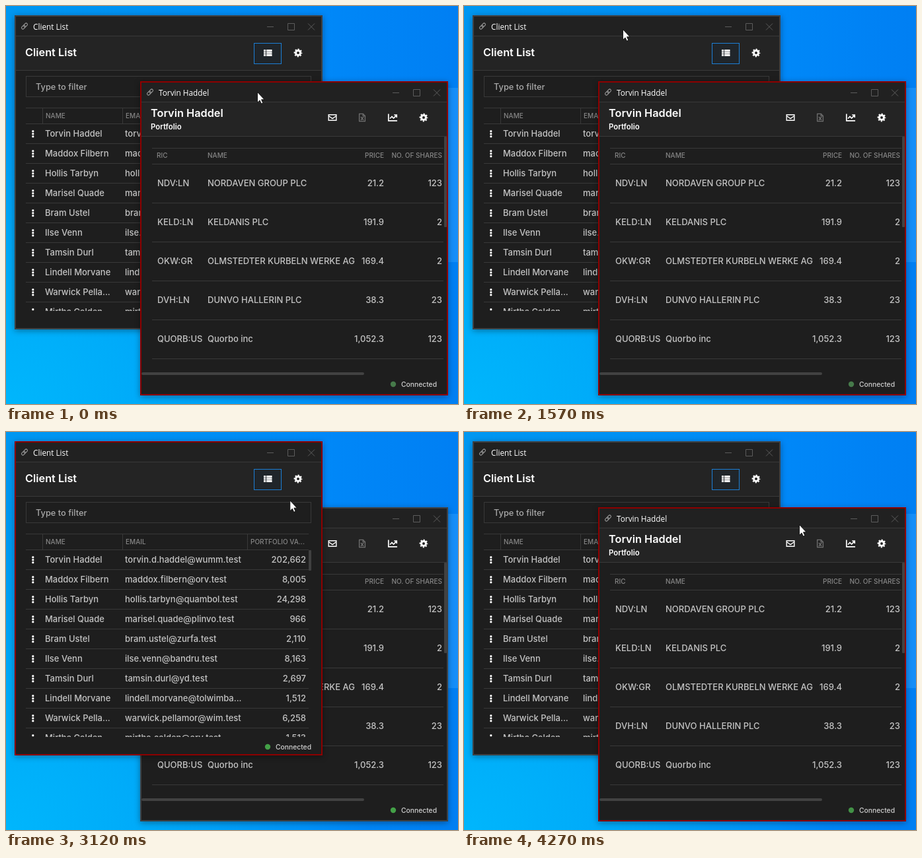
An HTML page that plays this animation: 684x603 px, repeating every 5930 ms.

```html
<!DOCTYPE html>
<html lang="en">
<head>
<meta charset="utf-8">
<title>Window focus</title>
<style>
  html, body { margin: 0; width: 100%; height: 100%; overflow: hidden; background: #008cf2; }
  svg { display: block; width: 684px; height: 603px; }
  text { font: 500 13px Inter, sans-serif; fill: #c4c4c4; white-space: pre; }
  .caption { font: 400 11.8px "Open Sans", sans-serif; fill: #fff; }
  .heading { font-size: 16.3px; font-weight: 600; fill: #fff; }
  .subtitle { font-size: 11.4px; font-weight: 600; fill: #fff; }
  .column { font-size: 10px; fill: #868686; }
  .status { font-size: 10.3px; fill: #d0d0d0; }
  .hint { font-size: 12.8px; fill: #a9a9a9; }
  .end { text-anchor: end; }
  .frame { fill: #1e1e1e; filter: drop-shadow(0 2px 5px rgba(0, 0, 0, .36)); }
  .border { fill: none; stroke-width: 2; }
</style>
</head>
<body>
<svg viewBox="0 0 684 603">
  <defs>
    <linearGradient id="sky">
      <stop offset="0" stop-color="#0097f1"/>
      <stop offset=".35" stop-color="#0090f3"/>
      <stop offset=".7" stop-color="#0088f8"/>
      <stop offset="1" stop-color="#007ff3"/>
    </linearGradient>
    <radialGradient id="glow" cx="0" cy="1" r=".8">
      <stop offset="0" stop-color="#00b6fc"/>
      <stop offset=".35" stop-color="#00b2fb" stop-opacity=".8"/>
      <stop offset="1" stop-color="#00b2fb" stop-opacity="0"/>
    </radialGradient>
    <clipPath id="clientRows"><rect x="15" y="155" width="460" height="307"/></clipPath>
  </defs>
  <rect width="684" height="603" fill="url(#sky)"/>
  <rect width="684" height="603" fill="url(#glow)"/>
  <rect x="668" y="124" width="264" height="264" fill="#2a9dff" opacity=".5"/>
  <g id="windows"><g id="clients"></g><g id="portfolio"></g></g>
  <path id="cursor" fill="#fff" stroke="#000" stroke-width=".8"/>
</svg>
<script>
const LOOP = 5930, STEP = 70;
const OWNER = 'Torvin Haddel';

const CLIENTS = [
  [OWNER, 'torvin.d.haddel@wumm.test', '202,662'],
  ['Maddox Filbern', 'maddox.filbern@orv.test', '8,005'],
  ['Hollis Tarbyn', 'hollis.tarbyn@quambol.test', '24,298'],
  ['Marisel Quade', 'marisel.quade@plinvo.test', '966'],
  ['Bram Ustel', 'bram.ustel@zurfa.test', '2,110'],
  ['Ilse Venn', 'ilse.venn@bandru.test', '8,163'],
  ['Tamsin Durl', 'tamsin.durl@yd.test', '2,697'],
  ['Lindell Morvane', 'lindell.morvane@tolwimba...', '1,512'],
  ['Warwick Pella...', 'warwick.pellamor@wim.test', '6,258'],
  ['Mirtha Calden', 'mirtha.calden@orv.test', '1,513']
];

const HOLDINGS = [
  ['NDV:LN', 'NORDAVEN GROUP PLC', '21.2', '123'],
  ['KELD:LN', 'KELDANIS PLC', '191.9', '2'],
  ['OKW:GR', 'OLMSTEDTER KURBELN WERKE AG', '169.4', '2'],
  ['DVH:LN', 'DUNVO HALLERIN PLC', '38.3', '23'],
  ['QUORB:US', 'Quorbo inc', '1,052.3', '123']
];

const box = (x, y, w, h, fill, extra = '') =>
  `<rect x="${x}" y="${y}" width="${w}" height="${h}" fill="${fill}" ${extra}/>`;
const label = (x, y, text, kind = '') => `<text x="${x}" y="${y}" class="${kind}">${text}</text>`;
const rule = (x, y, w) => box(x, y, w, 1, '#393939');
const stroke = (d, color, width = 1) =>
  `<path d="${d}" fill="none" stroke="${color}" stroke-width="${width}"/>`;
const at = (x, y, art) => `<g transform="translate(${x} ${y})">${art}</g>`;

const gear = (x, y) => at(x, y, `<g fill="none" stroke="#fff">
  <circle r="3.5" stroke-width="3"/>
  <circle r="5.4" stroke-width="2" stroke-dasharray="2.12" stroke-dashoffset="1.06"/></g>`);
const listIcon = (x, y) => at(x, y, [-5, -1.5, 2].map(top =>
  box(-6, top, 3, 3, '#fff') + box(-2, top, 8.5, 3, '#fff')).join(''));
const mailIcon = (x, y) => at(x, y, stroke('M-5.8-4.3H5.8V4.3H-5.8ZM-5.8-2.5L0 1.6L5.8-2.5', '#fff', 1.4));
const sheetIcon = (x, y) => at(x, y,
  stroke('M-4.4-5.6H1.4L4.4-2.6V5.6H-4.4ZM1.2-5.6V-2.4H4.4M-2-1L2 4M2-1L-2 4', '#707070', 1.3));
const chartIcon = (x, y) => at(x, y,
  stroke('M-6.2-5.5V4.8H7M-4 1.5L-1-1.5L1.5 1L5.5-3.2M2.2-4H6.2V0', '#fff', 1.7));

// Frame, title bar and header band shared by both windows.
const chrome = (title, dotY) => `
  <rect class="frame" x="13" y="14" width="466" height="476"/>
  ${box(15, 16, 462, 81, '#242424')}${box(15, 16, 462, 29, '#212121')}
  ${rule(15, 45, 462)}${rule(15, 97, 462)}
  <g transform="translate(28 30.5) rotate(-45)" fill="none" stroke="#a0a0a0">
    <rect x="-5.5" y="-2" width="6.5" height="4" rx="2"/><rect x="-1" y="-2" width="6.5" height="4" rx="2"/></g>
  ${label(41, 36, title, 'caption')}
  ${stroke('M395 31.5H405M426.5 26.5H436.5V36.5H426.5ZM457 26.5L467 36.5M467 26.5L457 36.5', '#5c5c5c')}
  <circle class="dot" cx="396" cy="${dotY}" r="4.2" fill="#43a047"/>
  ${label(462, dotY + 3.5, 'Connected', 'status end')}
  <rect class="border" x="14" y="15" width="464" height="474"/>`;

const clientRow = ([name, email, value], i) => {
  const y = 193 + 30 * i;
  return [-4, 0, 4].map(d => box(39.3, y + d - .7, 3, 3, '#fff', 'rx=".8"')).join('')
    + label(59, y + 5, name) + label(180, y + 5, email) + label(454, y + 5, value, 'end')
    + rule(30, y + 15, 428);
};

const holdingRow = ([ric, name, price, shares], i) => {
  const y = 273 + 59 * i;
  return label(229, y, ric) + label(305, y, name) + label(572, y, price, 'end')
    + label(660, y, shares, 'end') + rule(221, y + 25, 441);
};

const clients = document.getElementById('clients');
const portfolio = document.getElementById('portfolio');
const windows = document.getElementById('windows');
const cursor = document.getElementById('cursor');

clients.innerHTML = chrome('Client List', 477)
  + label(29, 76, 'Client List', 'heading')
  + box(375.5, 56.5, 41, 31, '#20252a', 'stroke="#1c7fd6"')
  + listIcon(396, 71) + gear(442, 71)
  + box(30.5, 106.5, 431, 31, 'none', 'stroke="#393939"')
  + label(45, 127, 'Type to filter', 'hint')
  + rule(30, 154, 428) + rule(30, 178, 428)
  + [55, 176, 365].map(x => box(x, 155, 1, 23, '#393939')).join('')
  + label(60, 170, 'NAME', 'column') + label(181, 170, 'EMAIL', 'column')
  + label(370, 170, 'PORTFOLIO VA...', 'column')
  + `<g clip-path="url(#clientRows)">${CLIENTS.map(clientRow).join('')}</g>`
  + box(458, 179, 4, 31, '#404040', 'rx="1"');

portfolio.innerHTML = at(190, 100, chrome(OWNER, 473))
  + label(219, 168, OWNER, 'heading') + label(219, 187, 'Portfolio', 'subtitle')
  + mailIcon(494, 169) + sheetIcon(539, 169) + chartIcon(585, 169) + gear(632, 169)
  + rule(221, 215, 441) + rule(221, 239, 441)
  + label(228, 230, 'RIC', 'column') + label(305, 230, 'NAME', 'column')
  + label(572, 230, 'PRICE', 'column end') + label(660, 230, 'NO. OF SHARES', 'column end')
  + HOLDINGS.map(holdingRow).join('')
  + box(663, 198, 4, 137, '#424242', 'rx="1"')
  + box(205, 555, 337, 4, '#424242', 'rx="2"');

const ARROW = 'M.5.5V16.2L4 12.9L6.4 18L8.8 17L6.5 11.8H11Z';
const RESIZE = 'M-11 0L-7-4V-1.2H7V-4L11 0L7 4V1.2H-7V4Z';

// Pointer waypoints: time, x, y.
const PATH = [
  [520, 380, 130], [940, 280, 67], [1150, 255, 48], [1500, 240, 35],
  [2630, 240, 35], [2700, 240, 36], [2980, 364, 78], [3190, 462, 116],
  [3260, 480.5, 130.5], [3330, 488, 133], [3610, 507, 140]
];

function pointerAt(t) {
  const next = PATH.findIndex(point => point[0] > t);
  if (next === 0) return PATH[0].slice(1);
  if (next < 0) return PATH[PATH.length - 1].slice(1);
  const [t0, x0, y0] = PATH[next - 1], [t1, x1, y1] = PATH[next];
  const k = (t - t0) / (t1 - t0);
  return [x0 + (x1 - x0) * k, y0 + (y1 - y0) * k];
}

function setBorder(win, active) {
  win.querySelector('.border').setAttribute('stroke', active ? '#8e0000' : '#3e4144');
}

function render(t) {
  const start = t < 2700 ? 590 : 2700;
  const tick = start + Math.floor((t - start) / STEP) * STEP;
  const [x, y] = pointerAt(tick);
  cursor.setAttribute('transform', `translate(${x} ${y})`);
  cursor.setAttribute('d', tick === 3260 ? RESIZE : ARROW);

  // A raised window gets its red border a moment after it comes forward.
  const front = t >= 1640 && t < 4140 ? clients : portfolio;
  if (windows.lastElementChild !== front) windows.append(front);
  setBorder(clients, t >= 1770 && t < 4140);
  setBorder(portfolio, t < 1640 || t >= 4270);
  portfolio.querySelector('.dot').setAttribute('fill',
    t < 1640 ? '#467a4a' : t < 4140 ? '#43a047' : '#429146');
}

const begin = performance.now();
(function loop() {
  render((performance.now() - begin) % LOOP);
  requestAnimationFrame(loop);
})();
</script>
</body>
</html>
```
